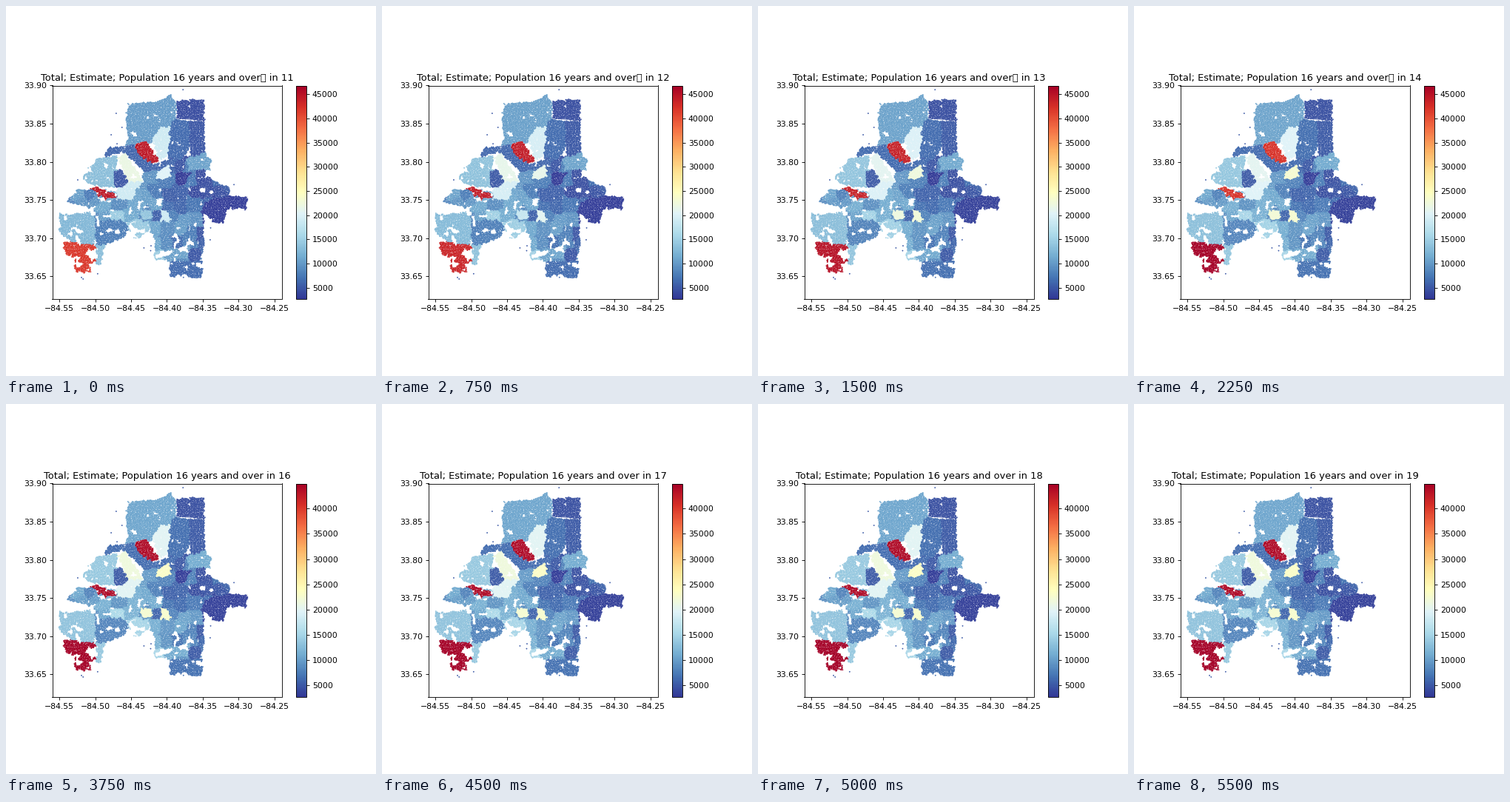
These frames come from a looping animation (500x500 px, 6000 ms). A matplotlib script:

```python
import numpy as np
import matplotlib.pyplot as plt
from matplotlib.animation import FuncAnimation
from matplotlib.path import Path
from matplotlib.ticker import MultipleLocator

plt.rcParams["font.family"] = "DejaVu Sans"
rng = np.random.default_rng(11)

SIZE = 500
STEP = 250  # ms per tick
HOLDS = [3] * 6 + [2] * 3  # ticks each year stays on screen
YEARS = np.repeat(np.arange(11, 20), HOLDS)
KEY_YEARS = (11, 13, 14, 15)
LEFT, TOP, WIDE, HIGH = 62.5, 107.5, 310, 288.75
X0, X1, Y0, Y1 = -84.56, -84.24, 33.62, 33.90


def noise(x, y, cell):
    """Smooth value noise in 0..1 on a grid of the given cell size."""
    n = int(SIZE / cell) + 3
    g = rng.random((n, n))
    i, j = (x // cell).astype(int), (y // cell).astype(int)
    u, v = x / cell - i, y / cell - j
    top = g[j, i] * (1 - u) + g[j, i + 1] * u
    low = g[j + 1, i] * (1 - u) + g[j + 1, i + 1] * u
    return top * (1 - v) + low * v


def grid(step, jitter):
    """Jittered lattice over the map, in stage pixels."""
    x, y = np.meshgrid(np.arange(66, 332, step), np.arange(116, 374, step))
    xy = np.column_stack([x.ravel(), y.ravel()])
    return xy + rng.uniform(-jitter, jitter, xy.shape)


# Address points; a warp roughens every border
homes = grid(1.3, 0.5)
px, py = homes.T
warped = homes + 4 * np.column_stack([noise(px, py, 3), noise(px, py, 3)]) - 2
people = np.full((len(KEY_YEARS), len(homes)), np.nan)


def area(v, *xy):
    """Fill a district; v in thousands, fixed or one per key year."""
    hit = Path(np.reshape(xy, (-1, 2))).contains_points(warped)
    if np.ndim(v) == 0:
        v = np.outer((1, 1.05, 1.07, 1.05), [v])
    elif len(v) == len(homes):
        v = np.outer((1, 1.05, 1.07, 1.05), v[hit])
    people[:, hit] = np.reshape(v, (len(KEY_YEARS), -1))


# Small inner tracts: cells of a loose lattice, emptier towards the east
seeds = grid(17, 6)
trend = np.interp(seeds[:, 0], (80, 150, 195, 225, 270, 300),
                  (9, 11.5, 9.5, 6.3, 5, 5)) + 2.5 * (seeds[:, 1] > 288)
trend = np.maximum(trend + rng.normal(0, 1.4, len(seeds)), 3)
nearest = np.abs(homes[:, None] - seeds).max(axis=2).argmin(axis=1)
area(trend[nearest], 82, 264, 96, 249, 113, 247, 150, 250, 186, 240, 222, 206,
     268, 200, 270, 231, 302, 246, 303, 262, 267, 264, 267, 331, 262, 346,
     200, 343, 203, 318, 190, 292, 120, 292, 118, 275)

RED = (44.6, 43.8, 42.2, 44.0)

# North
area(10.2, 166, 133, 206, 129, 222, 121, 230, 131, 229, 162, 205, 170,
     196, 186, 160, 188, 165, 178, 161, 150)
area(4.3, 230, 131, 238, 127, 268, 127, 268, 156, 231, 152)
area(6.3, 229, 153, 248, 157, 250, 188, 238, 206, 218, 206, 221, 163)
area(5.0, 247, 156, 268, 156, 268, 200, 250, 204)
area(19.0, 198, 180, 208, 165, 221, 163, 222, 178, 217, 205, 206, 208)
area(9.4, 184, 224, 206, 220, 203, 240, 187, 242)
area(6.0, 134, 204, 137, 192, 174, 187, 198, 213, 236, 204, 222, 218,
     188, 226, 171, 208, 156, 197)
area(RED, 174, 187, 191, 183, 207, 208, 197, 212, 181, 202)

# East
area(10.6, 244, 206, 268, 199, 278, 208, 276, 221, 247, 222)
area(3.2, 267, 264, 303, 257, 325, 259, 325, 275, 298, 274, 294, 293,
     284, 293, 266, 279)

# West
area(13.2, 104, 232, 122, 207, 151, 202, 147, 246, 114, 242)
area((21.8, 20.9, 20.9, 21.6), 150, 205, 160, 198, 186, 238, 165, 238)
area(19.0, 163, 238, 186, 237, 176, 250, 172, 263, 150, 262, 150, 248)
area(5.0, 145, 226, 152, 221, 160, 225, 165, 238, 159, 245, 147, 245)
area(RED, 112, 246, 122, 245, 150, 255, 149, 260, 133, 261)

# South
area(12.6, 71, 281, 95, 281, 119, 277, 121, 324, 84, 318, 72, 303)
area(13.2, 121, 322, 134, 322, 128, 349, 121, 349)
area(7.8, 120, 290, 152, 289, 166, 294, 163, 311, 134, 323, 121, 322)
area(14.4, 163, 293, 176, 288, 191, 292, 195, 300, 181, 313, 170, 314)
area((41.8, 45.2, 46.7, 45.0), 77, 318, 121, 322, 121, 346, 113, 347,
     115, 360, 95, 359, 92, 340, 79, 333)
area(6.4, 221, 345, 266, 345, 265, 367, 222, 366)

# Growing tracts and the empty block between them
area((20.4, 22.4, 23.4, 23.2), 204, 224, 221, 215, 225, 231, 204, 235)
area((18.8, 22.8, 23.5, 22.8), 209, 276, 216, 276, 223, 287, 221, 294, 209, 290)
area((14.0, 22.2, 23.0, 22.4), 181, 277, 190, 274, 198, 279, 197, 289, 184, 289)
area(np.nan, 202, 260, 211, 260, 211, 270, 202, 270)

# Unbuilt land: patchier in the west and south
density = 0.5 * noise(px, py, 4) + 0.5 * noise(px, py, 8)
land = np.isfinite(people[0])
built = land & (density < np.where((px < 150) | (py > 296), 0.66, 0.76))

# A few lone homes beyond the limits
lone = homes[rng.choice(np.flatnonzero(built), 260)] + rng.normal(0, 9, (260, 2))
gap = np.abs(lone[:, None] - homes[land]).max(axis=2).min(axis=1)
lone = lone[gap > 4]

xs, ys = np.vstack([homes[built], lone]).T
values = 1000 * np.hstack([people[:, built],
                           np.full((len(KEY_YEARS), len(lone)), 5.2)])
lon = X0 + (xs - LEFT) / WIDE * (X1 - X0)
lat = Y1 - (ys - TOP) / HIGH * (Y1 - Y0)

fig = plt.figure(figsize=(6.4, 6.4), dpi=SIZE / 6.4)
base = 1 - (TOP + HIGH) / SIZE
ax = fig.add_axes([LEFT / SIZE, base, WIDE / SIZE, HIGH / SIZE])
cax = fig.add_axes([391.9 / SIZE, base, HIGH / 20 / SIZE, HIGH / SIZE])
dots = ax.scatter(lon, lat, c=values[0], s=1.3, linewidths=0.5,
                  cmap="RdYlBu_r")
ax.set(xlim=(X0, X1), ylim=(Y0, Y1))
for axis in (ax.xaxis, ax.yaxis):
    axis.set_major_locator(MultipleLocator(0.05))
ax.ticklabel_format(useOffset=False)
title = ax.set_title("")
fig.colorbar(dots, cax=cax, ticks=MultipleLocator(5000))


def draw(i):
    year = YEARS[i]
    t = np.interp(year, KEY_YEARS, range(len(KEY_YEARS)))
    a = min(int(t), len(KEY_YEARS) - 2)
    dots.set_array(values[a] + (t - a) * (values[a + 1] - values[a]))
    late = year >= 15
    dots.set_clim(2650, 44950 if late else 46800)
    mark = "" if late else "\r"
    title.set_text(f"Total; Estimate; Population 16 years and over{mark} in {year}")
    return dots, title


anim = FuncAnimation(fig, draw, frames=len(YEARS), interval=STEP,
                     init_func=lambda: draw(0), repeat=True, repeat_delay=0)
plt.show()
```
